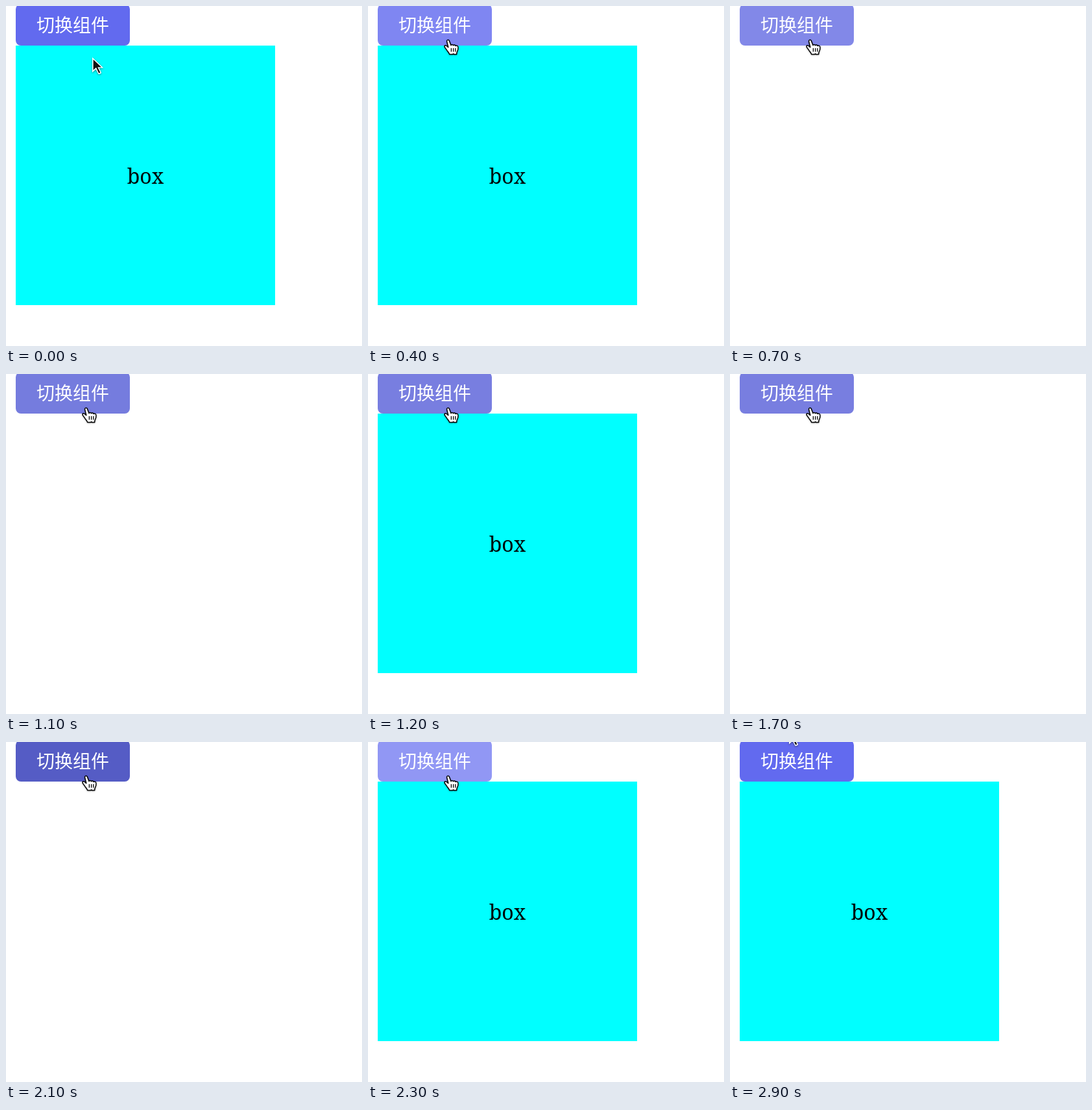
Recreate the animation shown at these times as an HTML page with a canvas. Size 549 by 524 pixels, loop 3 s.

```html
<!DOCTYPE html>
<html lang="zh">
<head>
<meta charset="utf-8">
<title>切换组件</title>
<style>
  html, body { margin: 0; width: 100%; height: 100%; overflow: hidden; background: #fff; }
  canvas { display: block; }
</style>
</head>
<body>
<canvas id="stage" width="549" height="524"></canvas>
<script>
const ctx = document.getElementById('stage').getContext('2d');
const LOOP = 3000, STEP = 100;

const REST = [98, 106, 239], HOVER = [145, 151, 244], PRESS = [82, 89, 195];
const mix = (a, b, k) => `rgb(${a.map((v, i) => Math.round(v + (b[i] - v) * k))})`;

// Each track holds its value until the next key: [time, value]
const fill = [
  [0, mix(REST, HOVER, 0)],
  [400, mix(REST, HOVER, 0.62)],
  [500, mix(REST, HOVER, 1)],
  [600, mix(HOVER, PRESS, 0.6)],
  [700, mix(PRESS, HOVER, 0.76)],
  [800, mix(PRESS, HOVER, 1)],
  [1100, mix(HOVER, PRESS, 0.44)],
  [1200, mix(PRESS, HOVER, 0.6)],
  [1300, mix(PRESS, HOVER, 1)],
  [1600, mix(HOVER, PRESS, 0.32)],
  [1700, mix(PRESS, HOVER, 0.6)],
  [1800, mix(PRESS, HOVER, 1)],
  [2100, mix(HOVER, PRESS, 0.95)],
  [2200, mix(PRESS, HOVER, 0.7)],
  [2300, mix(PRESS, HOVER, 1)],
  [2900, mix(REST, HOVER, 0)]
];
const boxShown = [[0, true], [700, false], [1200, true], [1700, false], [2200, true]];
const pointer = [
  [0, [arrow, 133, 79]],
  [100, [arrow, 133, 80]],
  [200, [arrow, 130, 74]],
  [300, [arrow, 124, 64]],
  [400, [hand, 117, 51]],
  [2400, [hand, 114, 43]],
  [2500, [hand, 102, 18]],
  [2600, [hand, 91, -9]],
  [2700, [hand, 91, -19]],
  [2900, [arrow, 91, -20]]
];

function at(track, t) {
  let value;
  for (const [time, v] of track) if (time <= t) value = v;
  return value;
}

function paint(path, color, shadow) {
  ctx.save();
  if (shadow) {
    ctx.shadowColor = 'rgba(0,0,0,0.45)';
    ctx.shadowBlur = 3;
    ctx.shadowOffsetY = 1;
  }
  ctx.fillStyle = color;
  ctx.fill(path);
  ctx.restore();
}

const arrowRim = new Path2D('M0 0V23.5L5.6 18.4L9.2 25.6Q10 26.4 11 26L13.6 24.8Q14.2 24.2 13.8 23.2L10.5 16.6H17.4Z');
const arrowCore = new Path2D('M1.6 3.6V19.8L6 15.8L10.2 24.6L12.4 23.5L8.3 15.2H14Z');
const handShape = new Path2D(
  'M4.6 3.6C4 1.4 7.2 0.2 8.3 2.4L11 9.4C12 8.2 13.8 8.4 14.5 9.6' +
  'C15.6 8.6 17.4 9 18 10.4C19.6 9.6 21.8 10.4 22 12.4' +
  'C22.4 15.4 21.6 17.8 20 20.6L19.6 23.6H15.6L14.6 22.6L13.4 23.6H8.8' +
  'C8 21.2 6.2 19.4 4.8 17.4C3.6 15.4 2.2 14 1.1 12.2' +
  'C0.2 10.2 2.4 9 4 10.2L6.8 12.6Z');
const handCreases = new Path2D('M11.4 14V19.6M14.6 14V19.6M17.8 14V19.6');

function arrow() {
  paint(arrowRim, '#fff', true);
  paint(arrowCore, '#111');
}

function hand() {
  paint(handShape, '#fff', true);
  ctx.strokeStyle = '#000';
  ctx.lineJoin = 'round';
  ctx.lineWidth = 1.5;
  ctx.stroke(handShape);
  ctx.lineWidth = 1.3;
  ctx.stroke(handCreases);
}

function label(text, x, y, font, color) {
  ctx.font = font;
  ctx.fillStyle = color;
  ctx.textAlign = 'center';
  ctx.fillText(text, x, y);
}

function draw(t) {
  ctx.fillStyle = '#fff';
  ctx.fillRect(0, 0, 549, 524);

  if (at(boxShown, t)) {
    ctx.fillStyle = '#0ff';
    ctx.fillRect(15, 61, 400, 400);
    label('box', 215, 274, '32px "Noto Serif", serif', '#000');
  }

  ctx.fillStyle = at(fill, t);
  ctx.beginPath();
  ctx.roundRect(15, -3, 176, 64, 8);
  ctx.fill();
  label('切换组件', 103, 40, '28px "Noto Sans CJK SC", "Noto Sans CJK", sans-serif', '#fff');

  const [shape, x, y] = at(pointer, t);
  ctx.save();
  ctx.translate(x, y);
  shape();
  ctx.restore();
}

const start = performance.now();
function tick() {
  const t = (performance.now() - start) % LOOP;
  draw(Math.floor(t / STEP) * STEP);
  requestAnimationFrame(tick);
}
tick();
</script>
</body>
</html>
```
